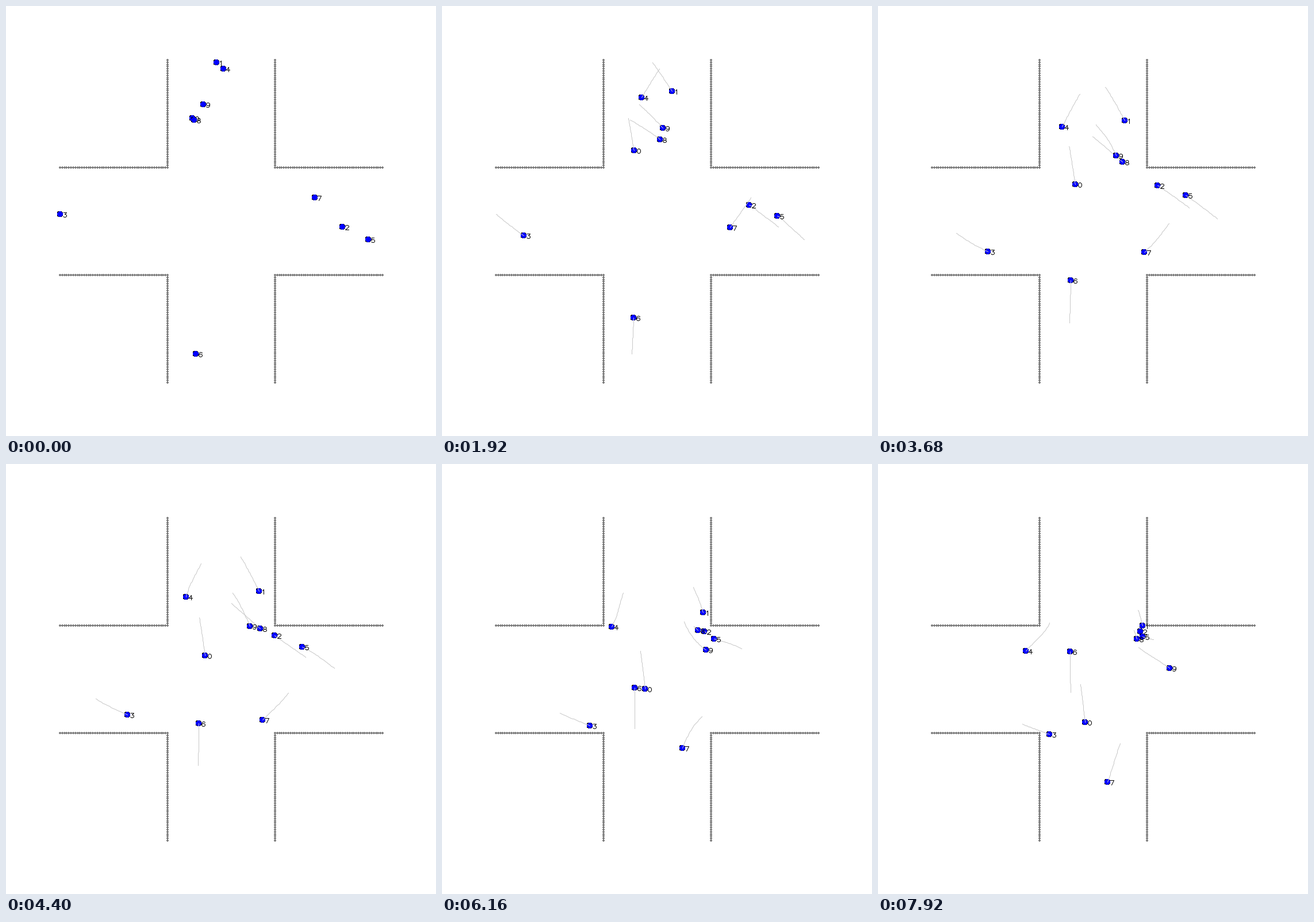
A matplotlib script for the animation above (8 s loop, 748 px wide and 748 px high).

```python
import numpy as np
import matplotlib.pyplot as plt
from matplotlib.animation import FuncAnimation
from matplotlib.patches import Circle

SIZE, DPI = 748, 100
FRAMES, INTERVAL = 100, 80
TRAIL = 25
PX = 72 / DPI
LAST = FRAMES - 1


def route(*points, arrive=LAST):
    """Steps along a smooth path that passes its points at equal times."""
    p = np.array(points, float)
    leg = np.diff(p, axis=0)
    a, b = leg[:-1], leg[1:]
    same_way = a * b > 0
    mean = 2 * a * b / np.where(same_way, a + b, 1)
    slope = np.vstack([leg[:1], np.where(same_way, mean, 0), leg[-1:]])
    slope[0] = 0.8 * (1.5 * leg[0] - 0.5 * slope[1])  # slower first steps

    u = np.clip(np.arange(FRAMES) / arrive, 0, 1) * len(leg)
    k = np.minimum(u.astype(int), len(leg) - 1)
    s = (u - k)[:, None]
    path = (p[k] + leg[k] * s * s * (3 - 2 * s)
            + s * (1 - s) * (slope[k] * (1 - s) - slope[k + 1] * s))
    return np.floor(path + 0.5)


ROUTES = [
    route((324, 195), (344, 319), (360, 449)),
    route((366, 98), (412, 168), (449, 243), (460, 281)),
    route((585, 384), (521, 336), (456, 291), arrive=60),
    route((94, 362), (162, 412), (235, 446), (298, 470)),
    route((378, 109), (346, 161), (317, 218), (298, 277), (257, 325)),
    route((630, 406), (575, 358), (513, 317), (460, 300), arrive=84),
    route((330, 605), (335, 467), (334, 326)),
    route((537, 333), (486, 404), (430, 467), (399, 553)),
    route((327, 198), (370, 225), (411, 259), (445, 289), (445, 289), (450, 304)),
    route((343, 171), (398, 230), (439, 305), (507, 355)),
]


def arc(cx, cy, rx, ry, start, end):
    a = np.radians(np.linspace(start, end, 17))
    return np.column_stack([cx + rx * np.cos(a), cy + ry * np.sin(a)])


def stroke(*parts):
    return np.vstack([np.atleast_2d(part) for part in parts])


# Single-stroke digits in a box 6 wide and 8 high, y pointing down.
SIX = stroke(arc(3.4, 4, 3.4, 4, 315, 180), arc(3, 5.5, 3, 2.5, 180, 540))
DIGITS = [
    arc(3, 4, 3, 4, 0, 360),
    stroke([(1, 2), (3, 0), (3, 8)]),
    stroke(arc(3, 2.2, 3, 2.2, 180, 390), [(0, 8), (6, 8)]),
    stroke([(1, 0), (6, 0), (3, 3)], arc(3, 5.5, 3, 2.5, 280, 510)),
    stroke([(4, 8), (4, 0), (0, 5), (6, 5)]),
    stroke([(5, 0), (1, 0), (0, 4)], arc(3, 5.4, 3, 2.6, 215, 510)),
    SIX,
    stroke([(0, 0), (6, 0), (2, 8)]),
    stroke(arc(3, 2, 2.5, 2, 90, 450), arc(3, 6, 3, 2, 270, 630)),
    np.array([6, 8]) - SIX,
]


def wall_image():
    """Four corners made of beads, each a 4 px square without its corners."""
    img = np.full((SIZE, SIZE, 3), 255, np.uint8)
    near, far = (94, 281), (468, 655)
    for span in (near, far):
        for v in np.rint(np.linspace(*span, 50)).astype(int):
            for edge in (near[1], far[0]):
                for x, y in ((v, edge), (edge, v)):
                    img[y - 2:y + 2, x - 1:x + 1] = 128
                    img[y - 1:y + 1, x - 2:x + 2] = 128
    return img


fig = plt.figure(figsize=(SIZE / DPI, SIZE / DPI), dpi=DPI, facecolor="white")
ax = fig.add_axes([0, 0, 1, 1])
ax.imshow(wall_image(), interpolation="nearest", aspect="auto", zorder=0)
ax.set(xlim=(-0.5, SIZE - 0.5), ylim=(SIZE - 0.5, -0.5))
ax.axis("off")


def disc(radius, color, zorder):
    return ax.add_patch(Circle((0, 0), radius, fc=color, lw=0,
                               antialiased=False, zorder=zorder))


def thin_line(color, zorder):
    return ax.plot([], [], color=color, lw=PX, snap=False, zorder=zorder)[0]


walkers = []
for n in range(len(ROUTES)):
    z = 4 * n + 1
    walkers.append((disc(5, "black", z), disc(4.2, (0, 0, 1), z + 1),
                    thin_line("#c8c8c8", z + 2), thin_line("black", z + 3)))


def update(i):
    for (rim, dot, trail, label), path, digit in zip(walkers, ROUTES, DIGITS):
        rim.center = dot.center = path[i] - 0.5
        trail.set_data(*path[max(0, i - TRAIL):i + 1].T)
        label.set_data(*(digit + path[i] + (5, -3)).T)
    return [artist for walker in walkers for artist in walker]


anim = FuncAnimation(fig, update, frames=FRAMES, interval=INTERVAL,
                     repeat=True, repeat_delay=0)
plt.show()
```
